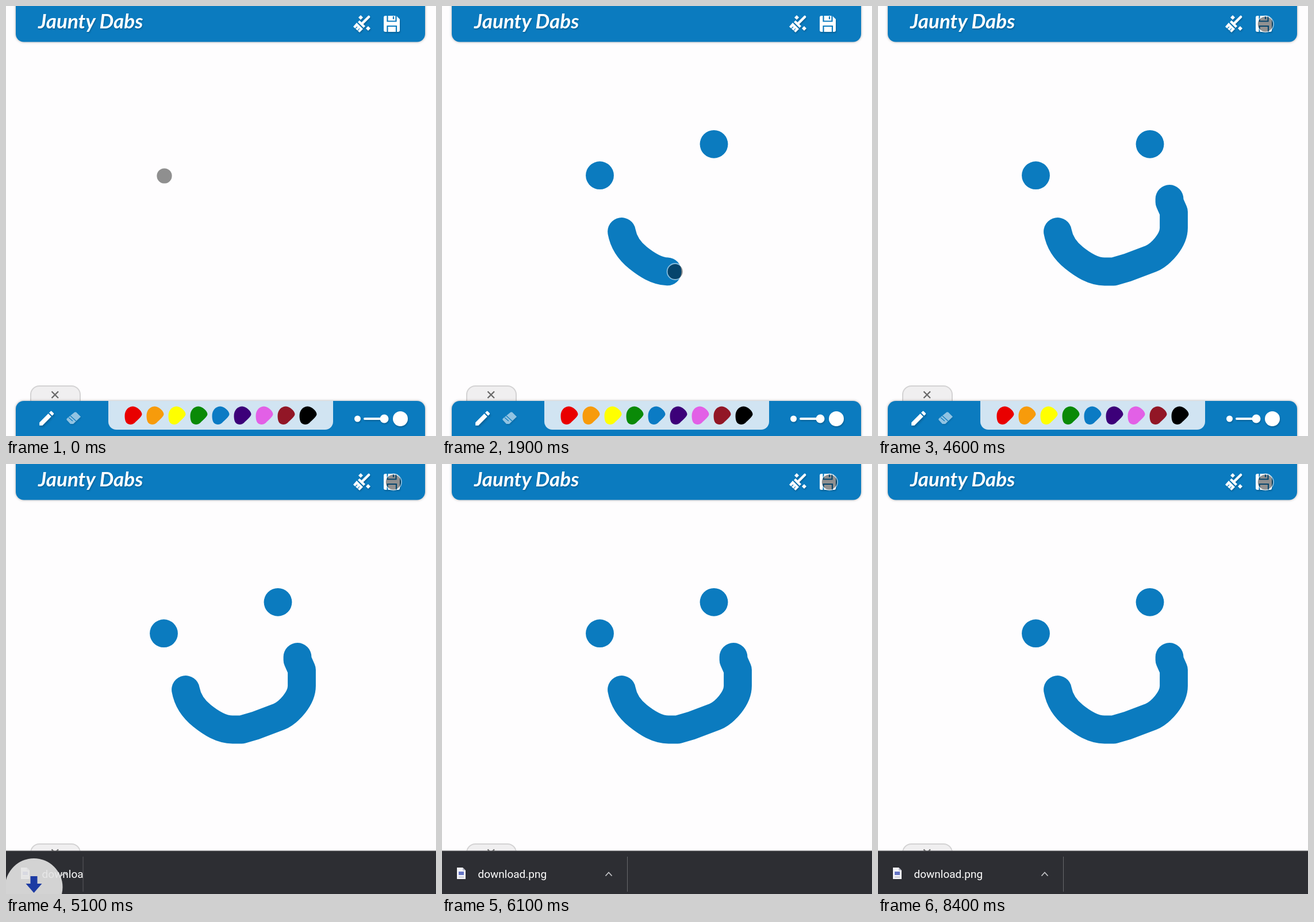
These frames come from a looping animation (748 px wide and 748 px high, 8.7 s). An HTML page:

```html
<!DOCTYPE html>
<html lang="en">
<head>
<meta charset="utf-8">
<title>Jaunty Dabs</title>
<style>
  html, body { margin: 0; width: 100%; height: 100%; overflow: hidden; background: #fefdfe; }
  svg { display: block; width: 100vw; height: 100vh; }
  .bar { fill: #0b7bbf; filter: drop-shadow(0 0 2px #0005); }
  .icon { fill: #fff; filter: drop-shadow(1px 2px 1px #0003); }
  .cut { fill: none; stroke: #0b7bbf; stroke-width: 2.2; }
  .thin { stroke-width: 1.2; }
  .line { fill: none; stroke: #fff; stroke-linecap: round; }
  .brand { font: italic 700 35px Lato, cursive; }
  .file { font: 19px Roboto, sans-serif; fill: #fff; }
</style>
</head>
<body>
<svg viewBox="0 0 748 748">
  <defs>
    <clipPath id="itemClip"><rect id="itemBox" y="673" height="75"/></clipPath>
    <path id="blob" d="M-14.500 1C-14.500-9-8-15.500 0-15.500C7-15.500 15.500-7 15.500-2C15.500 2 7 9 3 13C-1 17-8 16.500-11 13.500C-13.500 11-14.500 6-14.500 1Z"/>
    <path id="spark" d="M0-4L4 0 0 4-4 0Z"/>
  </defs>

  <g fill="#0b7bbf">
    <circle id="leftEye" cx="274.500" cy="294.700" r="24.400"/>
    <circle id="rightEye" cx="473" cy="240.300" r="24.400"/>
  </g>
  <path id="mouth" pathLength="100" fill="none" stroke="#0b7bbf" stroke-width="48.800"
    stroke-linecap="round" stroke-linejoin="round"
    d="M312.500 392.500C316 412 326 426 341 438S374 462 394 462H410L434 455 475 439.500C492 432 514.500 408 514.500 386V358L507 341V335.500"/>

  <!-- header -->
  <path class="bar" d="M17-9H729V48.500a14 14 0 0 1-14 14H31a14 14 0 0 1-14-14Z"/>
  <text class="icon brand" x="56" y="39">Jaunty Dabs</text>
  <g class="icon">
    <path class="line" stroke-width="4.500" d="M631 19L620 30"/>
    <path d="M615 25L625 35 622 38 612 28Z"/>
    <path d="M610 29L621 40 615 46 604 36Z"/>
    <path class="cut thin" d="M611 36L607 40M615 39L611 44"/>
    <use href="#spark" x="617" y="20"/>
    <use href="#spark" x="630" y="39"/>
  </g>
  <g class="icon">
    <path d="M660 17H679L685 23V42a3 3 0 0 1-3 3H660a3 3 0 0 1-3-3V20a3 3 0 0 1 3-3Z"/>
    <path class="cut" d="M663.500 17V26.500H678.500V17M674 18V23M663.500 45V35H679V45"/>
  </g>

  <!-- toolbar -->
  <path d="M43 690V676a15 15 0 0 1 15-15H114a15 15 0 0 1 15 15V690Z" fill="#f0eff0" stroke="#d3d2d3" stroke-width="2"/>
  <path d="M79.500 670.500L91 682M91 670.500L79.500 682" stroke="#686868" stroke-width="2.300"/>
  <path class="bar" d="M17 757V701a14 14 0 0 1 14-14H715a14 14 0 0 1 14 14V757Z"/>
  <path d="M178 687H569V723a14 14 0 0 1-14 14H192a14 14 0 0 1-14-14Z" fill="#d1e4f2"/>
  <g id="palette"></g>
  <path class="icon" transform="translate(54 700.500) scale(1.390)"
    d="M3 17.250V21h3.750L17.810 9.940l-3.750-3.750ZM20.710 7.040a1 1 0 0 0 0-1.410l-2.340-2.340a1 1 0 0 0-1.410 0l-1.830 1.830 3.750 3.750Z"/>
  <g opacity=".55">
    <path class="icon" d="M105.500 718L119.500 706.500 122 706.500 130 714.500 117 727H112L105.500 720Z"/>
    <path class="cut thin" d="M112 713L122 722M109 716L116 722"/>
  </g>
  <g class="icon">
    <circle cx="611.500" cy="718" r="5.500"/>
    <path class="line" stroke-width="4" d="M624 718H652"/>
    <circle cx="658" cy="718" r="7.500"/>
    <circle cx="686" cy="718" r="13"/>
  </g>

  <!-- download shelf -->
  <g id="shelf">
    <path d="M0 673H748V750H0Z" fill="#2d2e33"/>
    <path d="M0 673H748" stroke="#66676a"/>
    <g clip-path="url(#itemClip)">
      <path d="M26 702H36L41 707V722H26Z" fill="#f3f3f8"/>
      <path d="M36 702V707H41Z" fill="#b9bbc8"/>
      <path d="M29 709H38V715H29Z" fill="#6574c4"/>
      <path d="M29 718.500H38" stroke="#a5a6b4"/>
      <text class="file" x="62.500" y="720">download.png</text>
      <g id="itemEnd">
        <path d="M-38.500 716.500L-33 710.500-27.500 716.500" fill="none" stroke="#c4c5c8" stroke-width="1.800"/>
        <path d="M-.5 683V744" stroke="#67686c"/>
      </g>
    </g>
  </g>
  <g id="badge">
    <circle r="50" fill="#e5e5e5"/>
    <path d="M-6-19H6V-6H14L0 10-14-6H-6ZM-16 29H15V33H-16Z" fill="#1c3db0"/>
  </g>

  <g id="cursor">
    <circle r="13.300" fill="#000" fill-opacity=".435"/>
    <circle r="14" fill="none" stroke="#fff" stroke-opacity=".5" stroke-width="1.800"/>
  </g>
</svg>
<script>
  const LOOP = 8700, STEP = 100;
  const $ = id => document.getElementById(id);
  const mouth = $('mouth'), mouthLength = mouth.getTotalLength();
  const clamp = v => Math.min(1, Math.max(0, v));
  const span = (t, from, to) => clamp((t - from) / (to - from));
  const smooth = u => u * u * (3 - 2 * u);
  const easeOut = (u, power) => 1 - (1 - u) ** power;
  const show = (id, on) => $(id).style.display = on ? '' : 'none';
  const move = (id, x, y) => $(id).setAttribute('transform', `translate(${x} ${y})`);

  const paints = ['#e90000', '#f79b0b', '#ffff00', '#0a8a07', '#0b7bc4', '#3c0079', '#e260e6', '#921626', '#000'];
  $('palette').innerHTML = paints.map((paint, i) =>
    `<use href="#blob" x="${221 + 38 * i}" y="712" fill="${paint}"/>`).join('');

  // Pointer legs: start time, end time, start point, end point, easing
  const legs = [
    [100, 700, [275.5, 295.5], [473, 240], smooth],
    [900, 1500, [473, 240], [312, 392], smooth],
    [2700, 3200, [507, 335], [520.5, 311], smooth],
    [3200, 3400, [520.5, 311], [588, 192], u => u],
    [3400, 3900, [588, 192], [674, 31.5], u => easeOut(u, 2)]
  ];

  function pointer(t, drawn) {
    if (t >= 1700 && t < 2700) {
      const p = mouth.getPointAtLength(mouthLength * clamp(drawn + 0.042));
      return [p.x, p.y];
    }
    const [from, to, a, b, ease] = legs.filter(leg => t >= leg[0]).pop() || legs[0];
    const u = ease(span(t, from, to));
    return a.map((v, i) => v + (b[i] - v) * u);
  }

  function draw(t) {
    show('leftEye', t >= 100);
    show('rightEye', t >= 900);

    const drawn = easeOut(span(t, 1700, 2500), 1.5);
    show('mouth', t >= 1700);
    mouth.setAttribute('stroke-dasharray', drawn < 1 ? `${drawn * 100 + 0.01} 200` : 'none');
    move('cursor', ...pointer(t, drawn));

    show('shelf', t >= 5000);
    move('shelf', 0, 75 * (1 - span(t, 4900, 5100)));
    const itemWidth = 323 * easeOut(span(t, 5000, 5700), 3.5);
    $('itemBox').setAttribute('width', itemWidth);
    move('itemEnd', itemWidth, 0);

    const flight = span(t, 4900, 5400);
    show('badge', flight > 0 && flight < 1);
    move('badge', 48.5, 790 - 135 * flight);
    $('badge').setAttribute('opacity', clamp(0.94 - 4 * (flight - 0.5) ** 2));
  }

  const start = performance.now();
  function tick() {
    const t = (performance.now() - start) % LOOP;
    draw(Math.floor(t / STEP) * STEP);
    requestAnimationFrame(tick);
  }
  tick();
</script>
</body>
</html>
```
